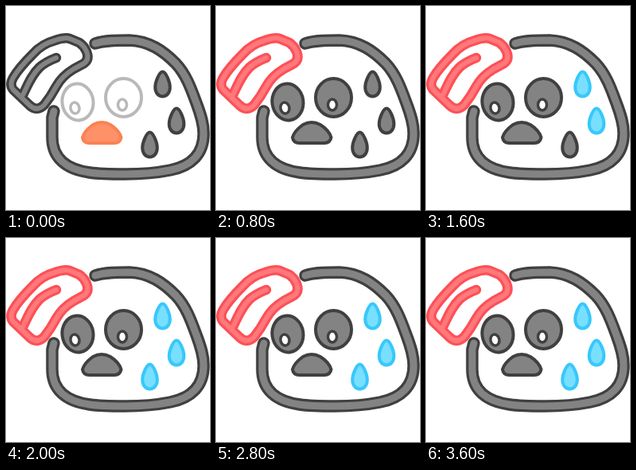
Animation of 256x256 px, one loop 4 s. Source, as an HTML page:

```html
<!DOCTYPE html>
<html>
<head>
<meta charset="utf-8">
<style>
html, body { margin: 0; width: 100%; height: 100%; overflow: hidden; background: #fff; }
svg { display: block; width: 100vw; height: 100vh; }
g { --edge: #404040; --fill: #838383; }
.tube path { fill: none; stroke-linejoin: round; stroke-linecap: round; }
.rim { stroke: var(--edge); }
.core { stroke: var(--fill); }
.solid { fill: var(--fill); stroke: var(--edge); stroke-width: 4; stroke-linejoin: round; }
.pupil { fill: #fff; stroke: var(--edge); stroke-width: 3.5; }
#body.on { --edge: url(#bodyEdge); --fill: url(#bodyFill); }
#hat.on { --edge: #fd5056; --fill: #ff787b; }
#eyes.on { --edge: #b9b9b9; --fill: #fff; }
#beak.on { --edge: #f98253; --fill: #ff9169; }
.drop.on { --edge: #38c8fb; --fill: #78dfff; }
</style>
</head>
<body>
<svg viewBox="0 0 256 256">
  <defs>
    <linearGradient id="bodyFill" gradientUnits="userSpaceOnUse" x1="0" y1="36" x2="0" y2="218">
      <stop offset=".12" stop-color="#8ce3f8"/>
      <stop offset=".42" stop-color="#b9e2b6"/>
      <stop offset=".68" stop-color="#f6e36c"/>
      <stop offset="1" stop-color="#ffe055"/>
    </linearGradient>
    <linearGradient id="bodyEdge" gradientUnits="userSpaceOnUse" x1="0" y1="36" x2="0" y2="218">
      <stop offset=".12" stop-color="#78d6f0"/>
      <stop offset=".42" stop-color="#a5d3a4"/>
      <stop offset=".68" stop-color="#ecd557"/>
      <stop offset="1" stop-color="#f3cc48"/>
    </linearGradient>
    <path id="bodyLine" d="M112 47C124 43 140 43 155 43C180 44 197 56 213 72C226 86 232 103 239 122C245 138 248 148 248 160C248 186 232 201 206 206C186 210 168 211 150 211C132 211 118 211 105 209C75 205 58 190 58 165V140L60 132"/>
    <path id="hatLine" d="M34 60C42 51 51 46 62 43Q74 39 80 41L92 46Q98 50 101 57Q105 67 98 72L85 79Q70 88 63 101Q56 114 48 124Q39 133 30 125L9 105Q4 99 9 90Q16 78 34 60ZM21 112C27 100 31 88 42 77Q50 70 63 65"/>
    <path id="dropShape" class="solid" d="M0-15.500C4-15.500 9.300-3 9.300 4C9.300 11 5 15.500 0 15.500S-9.300 11-9.300 4C-9.300-3-4-15.500 0-15.500Z"/>
  </defs>

  <g id="body" class="tube">
    <path class="rim" stroke-width="15.500"/>
    <path class="core" stroke-width="9"/>
  </g>
  <g id="hat" class="tube">
    <path class="rim" stroke-width="12.500"/>
    <path class="core" stroke-width="6"/>
  </g>
  <g id="eyes">
    <ellipse class="solid" cx="90" cy="120.500" rx="19.500" ry="23" transform="rotate(-8 90 120.500)"/>
    <ellipse class="solid" cx="147.500" cy="115" rx="22.500" ry="24"/>
    <ellipse class="pupil" cx="86.500" cy="128" rx="5.500" ry="7" transform="rotate(-12 86.500 128)"/>
    <ellipse class="pupil" cx="146" cy="124" rx="5.500" ry="7"/>
  </g>
  <g id="beak">
    <path class="solid" d="M96 165Q98 157 109 149Q120 143 131 149Q142 156 144.500 165Q143 172 136 172H105Q97 172 96 165Z"/>
  </g>
  <g class="drop" transform="translate(196.500 98)"><use href="#dropShape"/></g>
  <g class="drop" transform="translate(214 144)"><use href="#dropShape"/></g>
  <g class="drop" transform="translate(180.500 174)"><use href="#dropShape"/></g>
</svg>
<script>
const STEP = 400, STEPS = 10;
const byId = id => document.getElementById(id);
const light = (el, on) => el.classList.toggle('on', on);
const drops = document.querySelectorAll('.drop');

for (const name of ['body', 'hat']) {
  const line = byId(name + 'Line').getAttribute('d');
  byId(name).querySelectorAll('path').forEach(p => p.setAttribute('d', line));
}

function draw(now) {
  const step = Math.floor(now / STEP) % STEPS;
  const bodyOn = [1, 6, 8].includes(step);
  const faceOn = bodyOn || step === 0;
  light(byId('body'), bodyOn);
  light(byId('eyes'), faceOn);
  light(byId('beak'), faceOn);
  light(byId('hat'), !faceOn);
  // Drops switch on one by one after the hat.
  drops.forEach((drop, i) => light(drop, !faceOn && step >= i + 3));
}

const start = performance.now();
function tick() {
  draw(performance.now() - start);
  requestAnimationFrame(tick);
}
tick();
</script>
</body>
</html>
```
